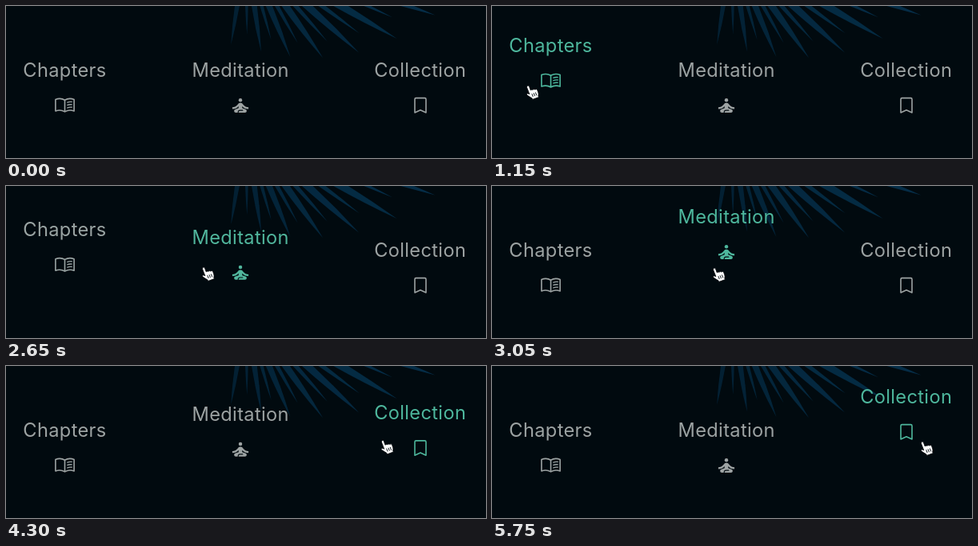
Animation, 600 px wide and 191 px high, one loop 5.8 s. Source, as an HTML page:

```html
<!DOCTYPE html>
<html lang="en">
<head>
<meta charset="utf-8">
<title>Hover menu</title>
<style>
  html, body { margin: 0; width: 100%; height: 100%; overflow: hidden; background: #010a0f; }
  svg { display: block; width: 600px; height: 191px; }
  text { font: 400 23.6px Montserrat, Inter, sans-serif; letter-spacing: .35px; text-anchor: middle; fill: currentColor; }
  .line { fill: none; stroke: currentColor; stroke-width: 1.6; stroke-linejoin: round; }
</style>
</head>
<body>
<svg viewBox="0 0 600 191">
  <rect width="600" height="191" fill="#010a0f"/>
  <g id="leaves" fill="#052d47"></g>

  <g class="item">
    <text x="73.5" y="89">Chapters</text>
    <g class="line" transform="translate(73.5 124.7)">
      <path d="M0-6.5C-3.5-8.6-8-8.7-11.6-7.2V7.3C-8 6-3.5 6.1 0 8.2C3.5 6.1 8 6 11.6 7.3V-7.2C8-8.7 3.5-8.6 0-6.5V8.2"/>
      <path d="M2.8-3.4Q5.8-4.7 9.2-4.2M2.8 0Q5.8-1.3 9.2-.8M2.8 3.4Q5.8 2.1 9.2 2.6" stroke-width="1.4"/>
    </g>
  </g>

  <g class="item">
    <text x="293.2" y="89">Meditation</text>
    <g fill="currentColor" transform="translate(293 125) scale(1.12) translate(-12 -12)">
      <circle cx="12" cy="6" r="2"/>
      <path d="M21 16v-2c-2.2 0-4.2-1-5.6-2.7l-1.3-1.6c-.4-.4-1-.7-1.6-.7h-1c-.6 0-1.2.3-1.6.7l-1.3 1.6C7.2 13 5.2 14 3 14v2c2.8 0 5.2-1.2 7-3.2V15l-3.9 1.5C5.4 16.8 5 17.5 5 18.2c0 1 .8 1.8 1.8 1.8H9v-.5c0-1.4 1.1-2.5 2.5-2.5h3a.5.5 0 0 1 0 1h-3c-.8 0-1.5.7-1.5 1.5v.5h7.2c1 0 1.8-.8 1.8-1.8 0-.7-.4-1.4-1.1-1.7L14 15v-2.2c1.8 2 4.2 3.2 7 3.2z"/>
    </g>
  </g>

  <g class="item">
    <text x="517.7" y="89">Collection</text>
    <path class="line" d="M511 134V117.2Q511 115.6 512.6 115.6H523.4Q525 115.6 525 117.2V134L518 130.8Z"/>
  </g>

  <g id="hand">
    <g transform="rotate(-20)" stroke-linejoin="round" stroke-linecap="round">
      <path d="M-1.6 1.2Q-1.5 -.3 0 -.3Q1.6 -.3 1.6 1.2V6.2Q3 5.7 4.4 6.6Q6 6 7 7.3Q9.6 6.8 9.6 9.2V12.5Q9.4 14.6 8.2 16.2V18H-.2V16.4Q-2.2 14 -4.7 10.6Q-5.4 8.9 -3.9 8.7Q-2.7 8.7 -1.6 10.2Z"
            fill="#fff" stroke="#03080c" stroke-width=".8"/>
      <path d="M1.6 11.3V14.6M4 11.3V14.6M6.4 11.3V14.6" fill="none" stroke="#10181d" stroke-width=".9"/>
    </g>
  </g>
</svg>
<script>
const LOOP = 5800, LIFT = 42, RISE = 400, TINT = 100;
const GRAY = [157, 163, 163], GREEN = [78, 183, 157];

// When the hand reaches each item, in ms; the previous item is released then.
const enters = [975, 2555, 4180];

// Fingertip at a few moments; it drifts evenly between them.
const stops = [
  { t: 900, x: 28, y: 108 },
  { t: 1150, x: 44.5, y: 100.5 },
  { t: 2650, x: 246.5, y: 102.5 },
  { t: 3050, x: 277.5, y: 103.5 },
  { t: 4000, x: 369, y: 91.5 },
  { t: 4500, x: 537.5, y: 95.5 }
];

const clamp = v => Math.min(1, Math.max(0, v));
const mix = (a, b, k) => a + (b - a) * k;
const items = [...document.querySelectorAll('.item')];
const hand = document.getElementById('hand');

// A fan of leaf blades around a point above the stage, long and short in turn.
function fan(count) {
  const cx = 300, cy = -70;
  let out = '';
  for (let i = 0; i < count; i++) {
    const u = i / (count - 1), size = i % 2 ? .86 : 1;
    const angle = mix(99, 19, u ** .85);
    const length = mix(120, 250, u ** 1.5) * size;
    const width = mix(6, 11, u) * size ** 3;
    out += `<path transform="translate(${cx} ${cy}) rotate(${angle})" opacity="${mix(.65, 1, u)}"
      d="M0 0Q${length / 2} ${width} ${length} 0Q${length / 2} ${-width} 0 0Z"/>`;
  }
  return out;
}
document.getElementById('leaves').innerHTML = fan(13);

// The standard "ease" curve, cubic-bezier(.25, .1, .25, 1).
function ease(x) {
  const bezier = (a, b, s) => 3 * a * s * (1 - s) ** 2 + 3 * b * s * s * (1 - s) + s ** 3;
  let lo = 0, hi = 1;
  for (let i = 0; i < 20; i++) {
    const mid = (lo + hi) / 2;
    if (bezier(.25, .25, mid) < x) lo = mid; else hi = mid;
  }
  return bezier(.1, 1, (lo + hi) / 2);
}

function drawHand(t) {
  const next = stops.findIndex(s => s.t > t);
  const b = stops.at(next), a = next > 0 ? stops[next - 1] : b;
  const k = a === b ? 0 : (t - a.t) / (b.t - a.t);
  hand.style.visibility = t < stops[0].t ? 'hidden' : 'visible';
  hand.setAttribute('transform', `translate(${mix(a.x, b.x, k)} ${mix(a.y, b.y, k)})`);
}

function draw(t) {
  items.forEach((item, i) => {
    const since = enters[i], until = enters[i + 1] ?? Infinity;
    const up = ease(clamp((t - since) / RISE)) - ease(clamp((t - until) / RISE));
    const tint = clamp((t - since) / TINT) - clamp((t - until) / TINT);
    item.setAttribute('transform', `translate(0 ${-LIFT * up})`);
    item.style.color = `rgb(${GRAY.map((c, n) => Math.round(mix(c, GREEN[n], tint)))})`;
  });
  drawHand(t);
}

const start = performance.now();
function tick() {
  draw((performance.now() - start) % LOOP);
  requestAnimationFrame(tick);
}
tick();
</script>
</body>
</html>
```
